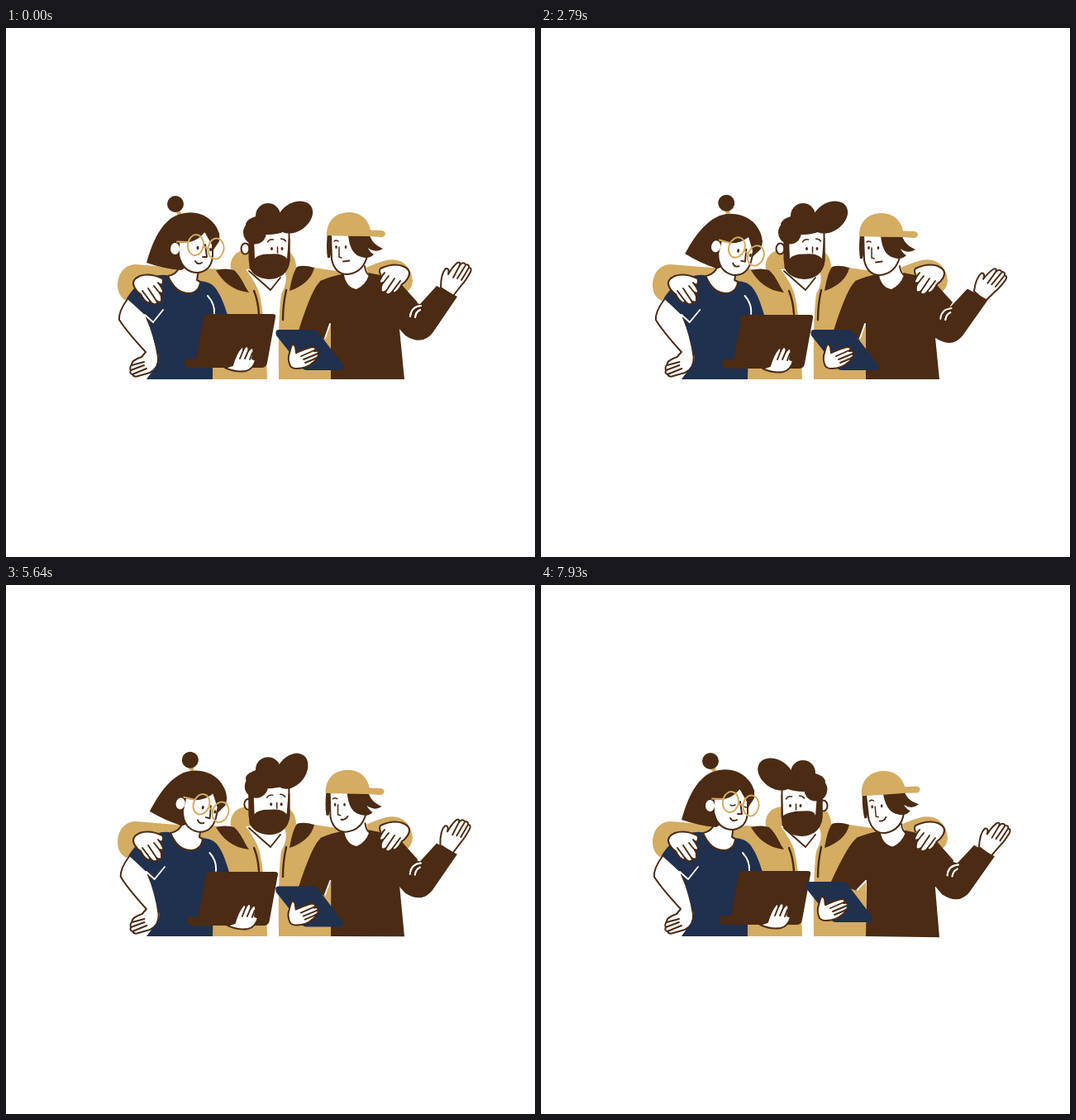
Animation, 640 px wide and 640 px high, one loop 8000 ms. Source, as an HTML page:

```html
<!DOCTYPE html>
<html lang="en">
<head>
<meta charset="utf-8">
<title>Three colleagues</title>
<style>
html, body { margin: 0; width: 100%; height: 100%; overflow: hidden; background: #fff; }
svg { display: block; width: 100vw; height: 100vh; }
.brown { fill: #4b2b13; }
.gold { fill: #d4ac62; }
.navy { fill: #20304f; }
.white { fill: #fff; }
.skin { fill: #fff; stroke: #4b2b13; stroke-width: 2; stroke-linejoin: round; stroke-linecap: round; }
.line { fill: none; stroke: #4b2b13; stroke-width: 1.9; stroke-linecap: round; stroke-linejoin: round; }
.thin { stroke-width: 1.5; }
.thick { stroke-width: 2.4; }
.seam { fill: none; stroke: #fff; stroke-width: 1.9; stroke-linecap: round; stroke-linejoin: round; }
.frame { fill: none; stroke: #d4ac62; stroke-width: 2; stroke-linecap: round; }
</style>
</head>
<body>
<svg viewBox="0 0 640 640">
  <defs>
    <g id="restingHand">
      <path class="skin" d="M189 310Q191 306 189 303Q174 296 162 300Q151 305 155 313Q158 319 163 322Q167 330 171 332Q174 333 174 330Q178 335 181 334Q184 333 182 330Q187 333 188 330Q189 325 186 320Q190 322 190 318Q188 313 184 308"/>
      <path class="line" d="M174 330L165 318M182 330L172 315M187 322L179 312"/>
    </g>
  </defs>

  <!-- coat -->
  <path class="gold" d="M157 286L206 290L272 292C270 278 279 268 294 268H336C346 270 351 279 351 290L373 290L420 297Q445 285 460 281C480 277 491 290 492 306Q491 316 484 320L393 335V425H250V330L155 333C140 330 135 322 135 310C136 295 145 286 157 286Z"/>
  <path class="brown" d="M254 293Q266 290 276 293C285 301 288 312 294 320C275 318 262 307 254 293ZM373 290Q360 286 352 289C347 297 345 307 343 318C359 313 370 303 373 290Z"/>
  <path class="white" d="M290 292L334 290Q344 302 333 322Q329 350 330 425H316Q314 360 308 328Q306 313 290 292Z"/>
  <path class="line" d="M294 294L320 317L332 302"/>
  <path class="line thick" d="M300 318Q305 330 306 346M339 317Q335 335 335 353"/>

  <!-- man's head -->
  <g id="manFace">
    <ellipse id="earLeft" class="skin" cy="267" rx="5" ry="6.5"/>
    <ellipse id="earRight" class="skin" cy="267" rx="5" ry="6.5"/>
    <path class="skin" d="M293 243H341V280Q340 300 317 302Q295 300 293 280Z"/>
    <path id="beard" class="brown"/>
    <g id="manEyes">
      <ellipse class="brown" cx="-6" cy="267" rx="1.5" ry="2.1"/>
      <ellipse class="brown" cx="6.5" cy="267" rx="1.5" ry="2.1"/>
      <path class="line thin" d="M-11 259Q-9 255 -4 256M5 255Q9 255 11 258M1 265V272"/>
    </g>
  </g>
  <g id="manHair" class="brown">
    <ellipse cx="317" cy="238" rx="27" ry="12"/>
    <circle cx="317" cy="227" r="15"/>
    <circle id="sideCurl" cy="247.5" r="14"/>
    <ellipse id="quiff" rx="24" ry="17"/>
  </g>

  <!-- woman -->
  <g id="womanBody">
    <path class="skin" d="M147 328Q136 343 137 353Q145 366 169 392L164 398Q152 402 152 407Q149 412 151 414Q149 418 153 419Q155 423 160 421L174 417Q185 412 184 398Q180 372 170 350"/>
    <path class="line" d="M152 408L167 404M151 414L167 408M153 419L170 412"/>
    <path class="navy" d="M178 301Q190 297 197 300L234 306Q247 307 252 313C260 322 265 338 268 347L250 365V425H170C177 414 186 408 185 398L171 350L146 327C154 315 163 304 178 301Z"/>
    <path class="skin" d="M210 284Q210 297 196 300Q205 321 221 321Q234 320 235 307L231 305L234 286"/>
    <path class="seam" d="M168 347L178 356L190 341M244 324Q253 334 252 346"/>
  </g>
  <g id="womanHead">
    <path class="frame" style="stroke-width:5;stroke-linecap:butt" d="M208 221L210 226"/>
    <circle class="brown" cx="205" cy="213" r="10"/>
    <path class="brown" d="M170 284C176 262 185 241 200 230C217 219 239 222 250 235C257 242 259 250 258 258L250 270L212 293Q190 291 170 284Z"/>
    <path class="skin" d="M209 258V275Q214 296 232 296Q249 294 250 275V262L241 246Z"/>
    <path class="brown" d="M205 259Q229 263 241 246Q250 251 251 264Q259 260 258 248L236 228L205 240Z"/>
    <ellipse class="white" cx="204.5" cy="267" rx="5.5" ry="7"/>
    <path class="line" d="M241 262L243 277H238M229 282Q232 287 237 284"/>
    <g id="womanOpen" class="brown">
      <ellipse cx="232" cy="266" rx="1.5" ry="2.2"/>
      <ellipse cx="247.5" cy="268" rx="1.5" ry="2.2"/>
    </g>
    <path id="womanShut" class="line thin" d="M229 266Q231 268 235 266M246 268Q248 270 251 268"/>
    <ellipse class="frame" cx="229.5" cy="262.5" rx="9.5" ry="12.5" transform="rotate(8 229 262)"/>
    <ellipse class="frame" cx="254" cy="267" rx="9.5" ry="12.5" transform="rotate(8 254 267)"/>
    <path class="frame" d="M207 258.5L220 259M239 265L244 266"/>
  </g>
  <g id="laptop">
    <path class="brown" d="M244 346H323Q327 346 326 350L316 405Q315 411 309 411H222Q216 411 216 405Q216 400 221 400H230L239 350Q240 346 244 346Z"/>
    <path class="skin" d="M265 411L274 408Q278 394 284 387Q288 384 287 390Q290 383 293 386Q294 388 293 391Q297 385 299 388Q300 391 298 400L302 402Q299 413 290 415Q278 417 265 411Z"/>
    <path class="line" d="M287 390L283 400M293 391L289 400M298 393L295 401"/>
  </g>

  <!-- boy -->
  <g id="boyBody">
    <g id="forearm">
      <g id="wave">
        <path class="skin" d="M526 314Q526 297 532 291Q537 290 535 298Q540 289 546 284Q550 282 549 287Q553 282 556 286Q561 286 560 290Q564 290 562 295Q556 306 552 310L541 324Z"/>
        <path class="line" d="M549 287L541 302M556 287L546 303M560 290L551 305"/>
      </g>
      <path class="brown" d="M470 325L501 334L521 312L546 325L516 369Q503 385 483 372L468 355Z"/>
      <path class="seam" d="M489 349Q490 337 502 336M495 350Q496 343 501 341"/>
    </g>
    <path id="sleeve" class="brown"/>
    <path class="brown" d="M380 306Q394 300 410 297L438 296L458 300Q472 302 480 312L498 332L476 364L482 425H393V357L376 330Z" clip-path="polygon(0 0)" style="clip-path:none"/>
    <path class="seam" d="M489 349Q490 337 502 336M495 350Q496 343 501 341" id="elbowSeam"/>
    <path id="armpit" class="seam"/>
    <path class="white" d="M411 290L409 299Q412 314 424 316Q435 311 439 299L434 285Z"/>
    <path class="line" d="M434 288Q435 296 439 299"/>
  </g>
  <g id="boyHead">
    <path class="brown" d="M389 248Q387 266 389 278H392L395 264V248Z"/>
    <path class="skin" d="M393 248L394 280Q398 298 413 298Q432 296 437 276V248Z"/>
    <path class="brown" d="M414 250H440Q442 261 456 267Q447 273 438 266Q440 271 445 274Q439 280 430 277Q416 274 414 250Z"/>
    <path class="gold" d="M388 251C388 232 400 223 415 223C430 223 439 233 441 244.5L455 245Q459 246 459 249Q458 253 454 253L440 252Q414 252 388 251Z"/>
    <ellipse class="brown" cx="399.5" cy="265" rx="1.3" ry="2"/>
    <ellipse class="brown" cx="411" cy="265" rx="1.3" ry="2"/>
    <path class="line thin" d="M397 258Q399 256 402 258M403 265V277L406 278"/>
    <path id="boyMouth" class="line"/>
  </g>
  <g id="tablet">
    <path class="navy" d="M330 365H372Q375 365 377 367L408 408Q410 414 404 414H364Q360 414 358 411L327 372Q325 365 330 365Z"/>
    <path class="skin" d="M344 409Q340 400 343 393L345 386Q347 380 350 386L351 393Q362 388 370 386Q377 386 373 391Q380 390 377 394Q380 397 374 400Q376 402 371 405Q364 412 352 412Q346 412 344 409Z"/>
    <path class="line" d="M373 390L357 397M377 394L360 401M374 400L362 405"/>
  </g>

  <use href="#restingHand"/>
  <use href="#restingHand" transform="translate(642 -12) scale(-1 1)"/>
</svg>
<script>
const LOOP = 8000;
const el = id => document.getElementById(id);
const set = (id, attrs) => {
  for (const name in attrs) el(id).setAttribute(name, attrs[name]);
};
const move = (id, transform) => set(id, { transform });
const ease = p => p < .5 ? 4 * p ** 3 : 1 - (2 - 2 * p) ** 3 / 2;

// Each key is [time, ...values]; values ease from one key to the next.
function at(keys, t) {
  const next = keys.findIndex(key => key[0] > t);
  if (next < 0) return keys.at(-1).slice(1);
  if (next === 0) return keys[0].slice(1);
  const a = keys[next - 1], b = keys[next];
  const p = ease((t - a[0]) / (b[0] - a[0]));
  return a.slice(1).map((v, i) => v + (b[i + 1] - v) * p);
}

const womanTilt = [[500, 0], [2000, 13], [2600, 13], [3400, 12.5], [5250, 12.5], [7100, .4], [7800, 0]];
const boyLean = [[300, 0, 0, 0], [1900, -3, 1, 0], [2700, -3, 1, 0], [3700, 0, 0, 0], [4000, 0, 0, 0],
  [4900, -3, 1, 0], [5300, -3, 1, 0], [6200, 4, 0, 1], [6500, 4, 0, 1], [7500, 2, 2, -5]];
// forearm x, y, turn and turn of the hand
const armSwing = [[200, 0, 0, 0, 0], [1800, -6, 3, 1, 7], [2600, -6, 3, 1, 7], [3700, 0, 0, 0, 0],
  [4900, -1, 0, 0, -2], [5300, -1, 0, 0, -2], [6200, 1.5, 1, 0, 2]];
const tabletShift = [[4300, 0, 0], [4900, -1, 0], [5300, -1, 0], [6200, 2, -2], [6400, 2, -2], [7400, -7, -6]];
const boySway = [[5300, 0], [6200, .8]];
const headTurn = [[5350, 1], [6550, -1]];
const gazeTurn = [[5350, 1], [6700, -1]];

const mouths = {
  flat: "M408 282.5L415.5 281.5",
  open: "M408 281Q411 279 415 281Q412 284 408 281Z",
  smile: "M407 283Q412 284 415 279"
};

function drawMan(t) {
  const [turn] = at(headTurn, t), [gaze] = at(gazeTurn, t);
  const lift = -10 * (1 - turn ** 4), side = turn ** 3;
  const left = 4 + 2.5 * turn, right = 4 - 2.5 * turn;
  move("manHair", `translate(0 ${lift})`);
  move("manFace", `translate(${1.5 * gaze} ${.45 * lift})`);
  move("manEyes", `translate(${317.5 + 8.5 * gaze} 0)`);
  move("quiff", `translate(${316.7 + 32.5 * turn} 229) rotate(${-90 + 55 * side})`);
  set("sideCurl", { cx: 316.7 - 15.7 * turn });
  set("earLeft", { cx: 301 - 13 * side });
  set("earRight", { cx: 330 - 13 * side });
  set("beard", { d: `M292 254H${292 + left}L${293 + left} 279Q304 273 318 273.500Q333 272 ${340 - right} 279
    L${342 - right} 254H342V282Q339 303 317 304Q299 303 293 290Z` });
}

function drawWoman(t) {
  const [tilt] = at(womanTilt, t);
  const shift = tilt / 13;
  const shut = t > 1850 && t < 2060 || t > 7850;
  move("womanHead", `rotate(${tilt} 220 297)`);
  move("womanBody", `translate(0 425) skewX(${-1.5 * shift}) translate(0 -425)`);
  move("laptop", `translate(${3 * shift} ${shift})`);
  set("womanOpen", { visibility: shut ? "hidden" : "visible" });
  set("womanShut", { visibility: shut ? "visible" : "hidden" });
}

function drawBoy(t) {
  const [hx, hy, lean] = at(boyLean, t);
  const [ax, ay, swing, wave] = at(armSwing, t);
  const [tx, ty] = at(tabletShift, t);
  const arm = `translate(${ax} ${ay}) rotate(${swing} 490 355)`;
  move("boyHead", `translate(${hx} ${hy}) rotate(${lean} 414 275)`);
  move("boyBody", `rotate(${at(boySway, t)[0]} 393 425)`);
  move("forearm", arm);
  move("elbowSeam", arm);
  move("wave", `rotate(${wave} 520 340)`);
  move("tablet", `translate(${tx} ${ty})`);
  set("sleeve", { d: `M381 306Q371 312 ${354 + tx * .6} ${366 + ty}L${385 + tx * .6} ${376 + ty}L394 356L400 320Z` });
  set("armpit", { d: `M392 358L${386 + tx * .6} ${375 + ty}` });
  set("boyMouth", { d: t < 3550 ? mouths.flat : t < 3950 ? mouths.open : mouths.smile });
}

function tick() {
  const t = performance.now() % LOOP;
  drawMan(t);
  drawWoman(t);
  drawBoy(t);
  requestAnimationFrame(tick);
}
tick();
</script>
</body>
</html>
```
